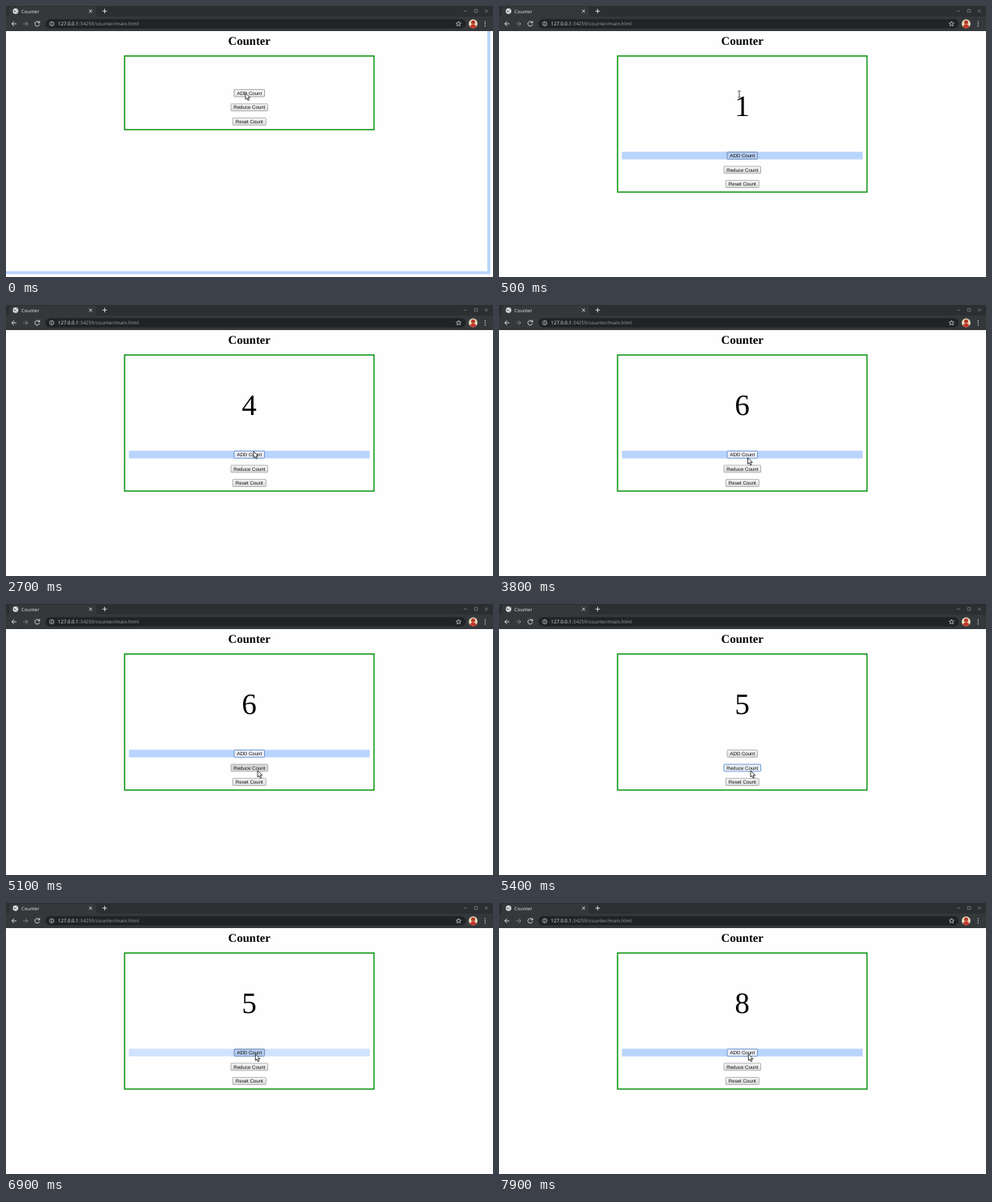
Write an HTML page that moves like this. It is 600 by 335 pixels and loops after 8 s.

```html
<!DOCTYPE html>
<html lang="en">
<head>
<meta charset="utf-8">
<title>Counter</title>
<style>
  html, body { margin: 0; height: 100%; overflow: hidden; background: #fefefe; }
  svg { display: block; width: 100vw; height: 100vh; text-rendering: geometricPrecision; }
  .ui { font: 6.05px "Open Sans", "Noto Sans", sans-serif; fill: #e8eaed; }
  .page { font: 36.5px "Liberation Serif", serif; text-anchor: middle; fill: #000; }
  .title { font-size: 14.6px; font-weight: bold; }
  .button text { font: 6.1px "Liberation Sans", sans-serif; text-anchor: middle; fill: #111; }
  .line { fill: none; stroke: #e4e6e8; stroke-width: .9; }
  .dim { stroke: #85898c; }
</style>
</head>
<body>
<svg viewBox="0 0 600 335">
  <defs>
    <linearGradient id="plain" x2="0" y2="1"><stop stop-color="#f7f7f7"/><stop offset="1" stop-color="#dcdcdc"/></linearGradient>
    <linearGradient id="hover" x2="0" y2="1"><stop stop-color="#fafafa"/><stop offset="1" stop-color="#e6e6e6"/></linearGradient>
    <clipPath id="round"><circle cx="575.5" cy="22" r="5.4"/></clipPath>
  </defs>

  <rect width="600" height="335" fill="#fefefe"/>
  <path id="edge" d="M593 31h3.7v300.6H0v-3.8h593z" fill="#b9d5fb"/>

  <!-- browser window -->
  <rect width="600" height="31" fill="#35383b"/>
  <path d="M0 0H600V13H113q-2 0-2-2V3q0-2-2-2H6Q4 1 4 3v8q0 2-2 2H0z" fill="#2b2f31"/>
  <rect x="48.5" y="16.3" width="518" height="11.4" rx="5.7" fill="#202325"/>
  <circle cx="11.8" cy="6.4" r="3.3" fill="#e8eaed"/>
  <path d="M9.3 5.4l2.2.4.6 1.4-1.2.5zM12.4 3.9l1.7.8-.8 1.1zM12.8 7.3l1.4.2-1.2 1.3z" fill="#44484b"/>
  <text class="ui" x="19" y="8.6" style="font-size:5.8px">Counter</text>
  <g class="line">
    <path d="M102.4 4.6l3.6 3.6m0-3.6l-3.6 3.6M118.8 6.3h5.6M121.6 3.5v5.6"/>
    <path d="M12.8 22H7.2m2.7-2.8L7.1 22l2.8 2.8"/>
    <path class="dim" d="M21.2 22h5.6m-2.7-2.8l2.8 2.8-2.8 2.8"/>
    <path d="M41 20.5a2.9 2.9 0 1 0 .3 2.3M41.4 18.7v2.2h-2.2"/>
    <circle cx="56.4" cy="22" r="2.6" stroke-width=".7"/>
    <path d="M56.4 21.5v2M56.4 20.1v.8" stroke-width=".7"/>
    <path d="M557.6 19l.9 2 2.1.2-1.6 1.4.5 2.1-1.9-1.1-1.9 1.1.5-2.1-1.6-1.4 2.1-.2z" stroke-width=".7"/>
    <path class="dim" d="M564 6.3h3.8M577.3 4.3h3.6v3.6h-3.6zM590 4.4l3.6 3.6m0-3.6L590 8" stroke-width=".7"/>
  </g>
  <text class="ui" x="64" y="24.2">127.0.0.1<tspan fill="#9a9fa3">:34259/counter/main.html</tspan></text>
  <g clip-path="url(#round)">
    <rect x="570" y="16" width="12" height="12" fill="#e9dfbd"/>
    <circle cx="575.5" cy="20.2" r="2.5" fill="#b33a2b"/>
    <ellipse cx="575.5" cy="27" rx="4.4" ry="4.3" fill="#c8362b"/>
  </g>
  <path d="M590.3 19.4v.01m0 2.6v.01m0 2.6v.01" stroke="#e4e6e8" stroke-width="1.3" stroke-linecap="round"/>

  <!-- page -->
  <text class="page title" x="299.8" y="48">Counter</text>
  <rect id="frame" x="146.1" y="61.8" width="307.3" fill="none" stroke="#0b9412" stroke-width="1.5"/>
  <text id="count" class="page" x="299.7" y="135.8"></text>
  <rect id="band" x="151.4" width="296.7" height="9.4" fill="#b9d5fd"/>
  <g id="buttons"></g>
  <path id="arrow" d="M0 0V7.9L1.8 6.3 3.1 9.2 4.5 8.6 3.2 5.8H5.7Z" fill="#fff" stroke="#111" stroke-width=".8"/>
  <path id="beam" d="M-1.8-3.9H-.5L0-3.5.5-3.9H1.8M-1.8 3.9H-.5L0 3.5.5 3.9H1.8M0-3.5V3.5" fill="none" stroke="#222" stroke-width=".8"/>
</svg>
<script>
const LOOP = 8000, STEP = 100;
const $ = id => document.getElementById(id);
const set = (el, attrs) => { for (const k in attrs) el.setAttribute(k, attrs[k]); };

// fill and border of each button state
const LOOKS = {
  plain: ['url(#plain)', '#a3a3a3'],
  hover: ['url(#hover)', '#8c8c8c'],
  press: ['#d9d9d9', '#a3a3a3'],
  focus: ['#eaeef5', '#5484cc'],
  tint:  ['#b3cbed', '#6280ad']
};

const buttons = [['ADD Count', 37.4, 184.9], ['Reduce Count', 45.4, 202.5], ['Reset Count', 41, 220]]
  .map(([label, width, y]) => {
    const make = (tag, parent) => parent.appendChild(document.createElementNS($('frame').namespaceURI, tag));
    const group = make('g', $('buttons')), box = make('rect', group), text = make('text', group);
    set(group, { class: 'button' });
    set(box, { x: 299.8 - width / 2, y: y - 4.4, width, height: 8.8, rx: .7, 'stroke-width': .8 });
    set(text, { x: 299.8, y: y + 2.1 });
    text.textContent = label;
    return { group, box, y };
  });

// [time, value]: each value holds until the next entry
const counts = [[0, ''], [200, 1], [1300, 2], [1800, 3], [2300, 4], [2900, 5], [3500, 6],
  [5300, 5], [5700, 4], [6400, 5], [7000, 6], [7400, 7], [7800, 8]];
const bands = [[0, null], [200, 0], [5300, null], [5700, 1], [6300, null], [6900, 0]];
const clicks = times => times.flatMap(t => [[t - 100, 'press'], [t, 'focus']]);
const looks = [
  [[0, 'hover'], [100, 'press'], [200, 'tint'], [900, 'focus'], ...clicks([1300, 1800, 2300, 2900, 3500]),
    [5300, 'plain'], [6200, 'hover'], ...clicks([6400]), [6900, 'tint'], [7000, 'focus'], ...clicks([7400, 7800])],
  [[0, 'plain'], [4000, 'hover'], [4100, 'plain'], [4500, 'hover'], [5100, 'press'], [5300, 'focus'],
    [5600, 'press'], [5700, 'tint'], [6300, 'plain']],
  [[0, 'plain']]
];
// [time, x, y] of the pointer, straight lines between
const path = [[0, 295, 107.5], [400, 296, 109], [500, 296, 109], [900, 305, 181], [3700, 305, 181],
  [4100, 311, 212], [4400, 311, 212], [4700, 310, 206], [5700, 310, 206], [6100, 307.3, 189.5],
  [6200, 307.3, 186.8], [LOOP, 307.3, 186.8]];

const at = (list, t) => list.filter(e => e[0] <= t).pop()[1];
function pointer(t) {
  const i = path.findIndex(p => p[0] > t);
  const [t0, x0, y0] = path[i - 1], [t1, x1, y1] = path[i];
  const k = (t - t0) / (t1 - t0);
  return [x0 + (x1 - x0) * k, y0 + (y1 - y0) * k];
}

function draw(now) {
  const t = Math.floor(now % LOOP / STEP) * STEP;
  const count = at(counts, t), band = at(bands, t), shift = count === '' ? -77.2 : 0;
  $('count').textContent = count;
  set($('edge'), { visibility: t < 100 ? 'visible' : 'hidden' });
  set($('frame'), { height: 168.2 + shift });
  set($('band'), {
    y: band === null ? 0 : buttons[band].y - 4.7,
    opacity: band === null ? 0 : t === 6900 ? .65 : 1
  });
  buttons.forEach(({ group, box }, i) => {
    const [fill, stroke] = LOOKS[at(looks[i], t)];
    set(group, { transform: `translate(0 ${shift})` });
    set(box, { fill, stroke });
  });
  const overText = t >= 200 && t < 800;
  const transform = `translate(${pointer(t)})`;
  set($('arrow'), { transform, visibility: overText ? 'hidden' : 'visible' });
  set($('beam'), { transform, visibility: overText ? 'visible' : 'hidden' });
}

const start = performance.now();
(function tick() {
  draw(performance.now() - start);
  requestAnimationFrame(tick);
})();
</script>
</body>
</html>
```
